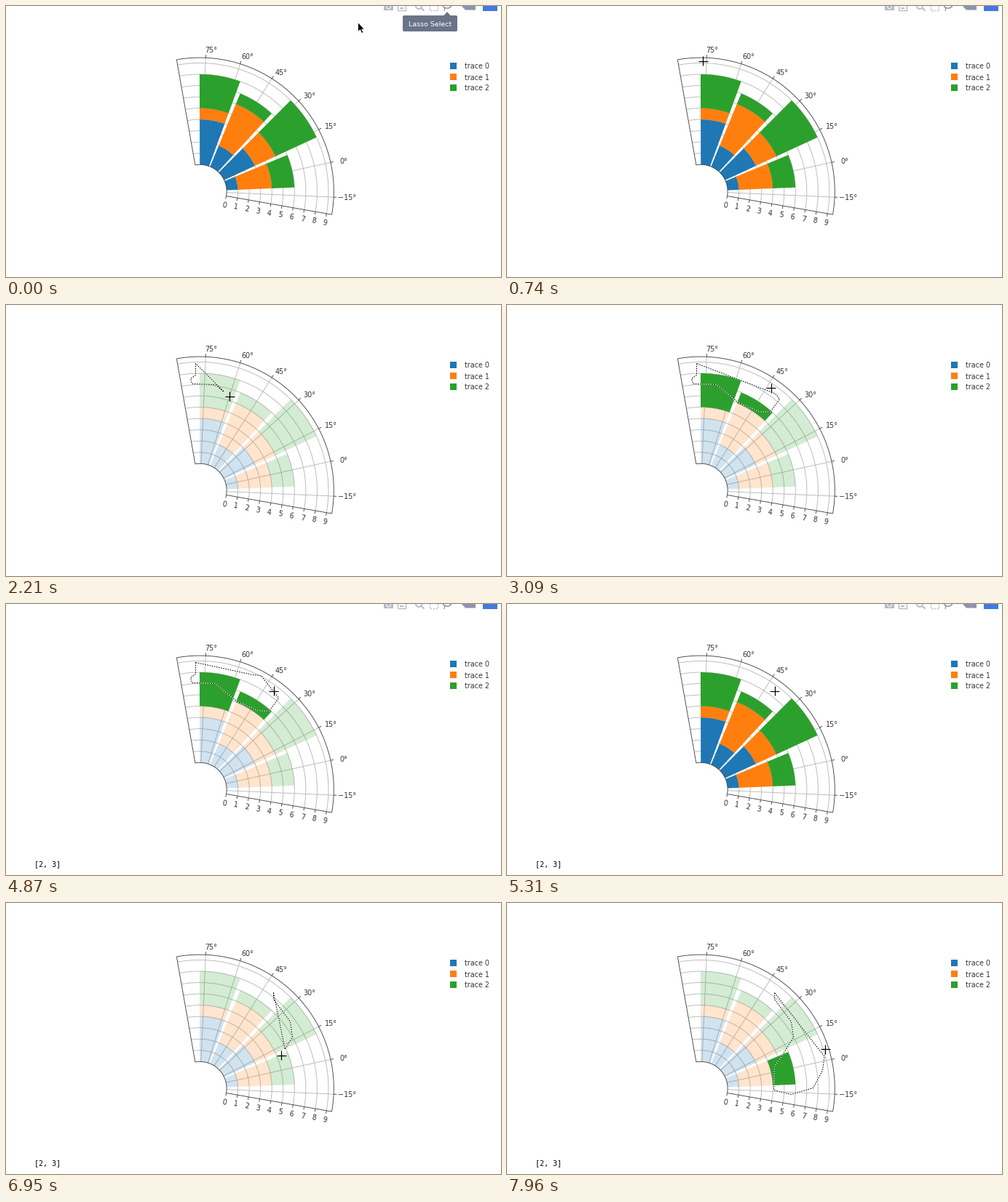
A matplotlib script that plays this animation: 680 px wide and 373 px high, repeating every 8 s.

```python
import numpy as np
import matplotlib.pyplot as plt
from matplotlib.animation import FuncAnimation
from matplotlib.patches import Arc, Circle, FancyBboxPatch, Polygon, Rectangle
from matplotlib.path import Path

W, H, DPI = 680, 373, 100
PX = 72 / DPI                       # points per pixel
LOOP_MS, INTERVAL, STEP_MS = 8000, 40, 147.4

CENTER = np.array([266.3, 255.1])
R_OUT = 184
R_IN = R_OUT * 0.2
UNIT = (R_OUT - R_IN) * 0.95 / 9    # pixels per radial unit
START, END, ROTATION = -10, 100, 12.5
COLORS = ["#1f77b4", "#ff7f0e", "#2ca02c"]
STACKS = [(1, 3, 2), (3, 2, 4), (2, 4, 1), (4, 1, 3)]
BAR_PITCH, BAR_WIDTH = 22.5, 20.25
INK, GRID, TEXT = "#444444", "#b8b8b8", "#333333"
ICON, ICON_DARK = "#b5bbd0", "#8c94ae"

# Steps of the story
DRAG_A, RELEASE, CLEAR, DRAG_B = 10, 25, 36, 43

plt.rcParams["font.family"] = "DejaVu Sans"
fig = plt.figure(figsize=(W / DPI, H / DPI), dpi=DPI, facecolor="white")
ax = fig.add_axes([0, 0, 1, 1])
ax.set(xlim=(0, W), ylim=(H, 0))
ax.axis("off")
add = ax.add_patch


def direction(deg):
    a = np.radians(deg)
    return np.stack([np.cos(a), -np.sin(a)], axis=-1)


def polar(r, deg):
    return CENTER + r * direction(deg)


def radius(value):
    return R_IN + value * UNIT


def line(points, color=INK, width=0.9, z=3, **kw):
    x, y = np.asarray(points, float).T
    return ax.plot(x, y, color=color, lw=width * PX, zorder=z,
                   solid_capstyle="butt", **kw)[0]


def spoke(angle, r0, r1, *style, **kw):
    return line([polar(r0, angle), polar(r1, angle)], *style, **kw)


def label(x, y, text, ha="center", color=TEXT, size=9.7, **kw):
    """Text whose digits are centred on y."""
    return ax.text(x, y + 3.5, text, ha=ha, va="baseline", color=color,
                   fontsize=size * PX, **kw)


# --- polar grid and axes ---
sweep = np.linspace(START, END, 120)
for value in range(1, 10):
    line(polar(radius(value), sweep), GRID, z=1)
for r in (R_IN, R_OUT):
    line(polar(r, sweep))
for angle in (START, END):
    spoke(angle, R_IN, R_OUT)

for theta in range(-15, 90, 15):
    angle = theta + ROTATION
    spoke(angle, R_IN, R_OUT, GRID, z=1)
    spoke(angle, R_OUT, R_OUT + 4)
    x, y = polar(R_OUT + 10.75, angle)
    label(x + 7.2, y + 0.3, f"{theta}°".replace("-", "\u2212"))

down = direction(START - 90)
for value in range(10):
    foot = polar(radius(value), START)
    line([foot, foot + 4 * down])
    x, y = foot + 16 * down
    label(x, y - 3.5, str(value), rotation=START, rotation_mode="anchor")

# --- stacked bars: (patch, point that the lasso must enclose) ---
bars = []
for i, stack in enumerate(STACKS):
    mid = ROTATION + BAR_PITCH * i
    span = mid + BAR_WIDTH * np.linspace(-0.5, 0.5, 30)
    edges = radius(np.cumsum((0, *stack)))
    for inner, outer, color in zip(edges, edges[1:], COLORS):
        outline = np.vstack([polar(inner, span), polar(outer, span[::-1])])
        bars.append((add(Polygon(outline, facecolor=color, lw=0, zorder=2)),
                     polar(outer, mid)))

# --- legend ---
for i, color in enumerate(COLORS):
    add(Rectangle((610, 78 + 15 * i), 9, 9, facecolor=color, lw=0))
    label(630, 83 + 15 * i, f"trace {i}", ha="left")


# --- toolbar, cut by the top edge ---
def tray(x, color, **kw):
    """Lower half of a square icon."""
    return line([(x, -2), (x, 5.5), (x + 11, 5.5), (x + 11, -2)], color, 1.4, **kw)


toolbar = [
    add(Rectangle((519, -4), 13, 10, color=ICON, lw=0)),
    add(Circle((525.5, 1), 2.8, fill=False, edgecolor="white", lw=PX)),
    tray(538, ICON),
    line([(541, 3), (546, 3)], ICON, 2),
    add(Circle((567, 0), 4, fill=False, edgecolor=ICON, lw=1.8 * PX)),
    line([(570, 2.5), (574.5, 6.5)], ICON, 2),
    tray(581.5, ICON, dashes=(1.5, 1.2)),
    add(Arc((606, -1), 11.5, 8, edgecolor=ICON_DARK, lw=1.6 * PX)),
    line([(603, 2), (602, 7)], ICON_DARK, 1.3),
    add(Polygon([(625, -1), (631, 5.5), (645, 5.5), (645, -1)], color=ICON_DARK, lw=0)),
    add(Rectangle((655, -13), 20, 20, color="#447adb", lw=0)),
]

tooltip = [
    add(FancyBboxPatch((547, 15), 71, 18, boxstyle="round,pad=2,rounding_size=2",
                       facecolor="#69738a", lw=0, zorder=5)),
    add(Polygon([(601, 13.5), (606, 8), (611, 13.5)], color="#69738a", lw=0, zorder=5)),
    label(582.5, 24, "Lasso Select", color="white", size=9.5, zorder=6),
]
selection = label(39, 358, "[2, 3]", ha="left", color="black", size=10,
                  family="DejaVu Sans Mono")


# --- lasso and pointer ---
class Drag:
    """A freehand path followed at constant speed; its trail lags the pointer."""
    LAG, HEAD_START = 10, 5

    def __init__(self, first, speed, points):
        self.first, self.speed = first, speed
        self.points = np.array(points) + 0.5
        lengths = np.hypot(*np.diff(self.points, axis=0).T)
        self.arc = np.concatenate([[0], np.cumsum(lengths)])

    def at(self, s):
        return np.column_stack([np.interp(s, self.arc, c) for c in self.points.T])

    def travelled(self, step):
        s = self.HEAD_START + self.speed * (step - self.first)
        return np.clip(s, 0, self.arc[-1])

    def pointer(self, step):
        return self.at([self.travelled(step)])[0]

    def trail(self, step):
        s = self.travelled(step)
        tip = s if s == self.arc[-1] else s - self.LAG
        return self.at(np.append(self.arc[self.arc < tip], tip)) if tip > 0 else None


drag_a = Drag(DRAG_A, 16.9, [(260, 80), (260, 96), (253, 101), (255, 108), (287, 109),
                             (316, 133), (345, 146), (361, 147), (374, 129), (350, 98),
                             (339, 97)])
drag_b = Drag(DRAG_B, 23.4, [(367, 123), (367, 132), (390, 163), (393, 184), (376, 212),
                             (367, 224), (366, 257), (390, 263), (420, 254), (433, 230),
                             (437, 200)])

# Free pointer moves between the drags: step, x, y
MOVES = np.array([(0, 483, 22), (3, 273, 73), (4, 273, 73), (7, 260, 80),
                  (30, 339, 97), (33, 367, 119), (37, 367, 119), (41, 367, 123)])


def pointer_at(step):
    if DRAG_A - 3 <= step <= 30:
        return drag_a.pointer(step)
    if step >= DRAG_B - 2:
        return drag_b.pointer(step)
    keys, *coords = MOVES.T
    return np.array([np.interp(step, keys, c) for c in coords]) + 0.5


def lasso_at(step):
    if step < CLEAR:
        return drag_a.trail(step)
    return drag_b.trail(step)


def toolbar_alpha(step):
    if RELEASE - 1 <= step < DRAG_B - 2:
        return min((step - RELEASE + 1) / 2, 1)
    press = DRAG_A if step < RELEASE else DRAG_B
    return np.clip((press + 1 - step) / 3, 0, 1) ** 2


lasso_style = dict(fill=False, lw=PX, capstyle="butt", visible=False)
lasso_lines = [
    add(Polygon(drag_a.points, edgecolor="white", zorder=7, **lasso_style)),
    add(Polygon(drag_a.points, edgecolor="black", zorder=8,
                linestyle=(0, (1.6, 1.6)), **lasso_style)),
]
ARROW = np.array([(0, 0), (0, 13), (3, 10.2), (5.2, 15), (7.3, 14), (5.2, 9.5), (9, 9.5)])
arrow = add(Polygon(ARROW, facecolor="black", edgecolor="white", lw=0.8 * PX, zorder=9))
cross = [line([(0, 0), (1, 1)], "black", 1.2, z=9) for _ in range(2)]


def draw(frame):
    step = int((frame * INTERVAL + 30) / STEP_MS)

    for item in tooltip:
        item.set_visible(step == 0)
    selection.set_visible(step >= RELEASE)
    for item in toolbar:
        item.set_alpha(toolbar_alpha(step))

    lasso = lasso_at(step)
    for outline in lasso_lines:
        outline.set_visible(lasso is not None)
        if lasso is not None:
            outline.set_xy(lasso)
    for patch, anchor in bars:
        lit = lasso is None or Path(np.vstack([lasso, lasso[:1]])).contains_point(anchor)
        patch.set_alpha(1 if lit else 0.2)

    x, y = pointer_at(step)
    on_plot = np.hypot(*(CENTER - (x, y))) < R_OUT + 2
    arrow.set_visible(not on_plot)
    arrow.set_xy(ARROW + (x, y))
    for part, dx, dy in zip(cross, (6.5, 0), (0, 6.5)):
        part.set_visible(on_plot)
        part.set_data([x - dx, x + dx], [y - dy, y + dy])
    return []


anim = FuncAnimation(fig, draw, frames=LOOP_MS // INTERVAL, interval=INTERVAL,
                     init_func=lambda: draw(0), repeat=True, repeat_delay=0, blit=False)
plt.show()
```
